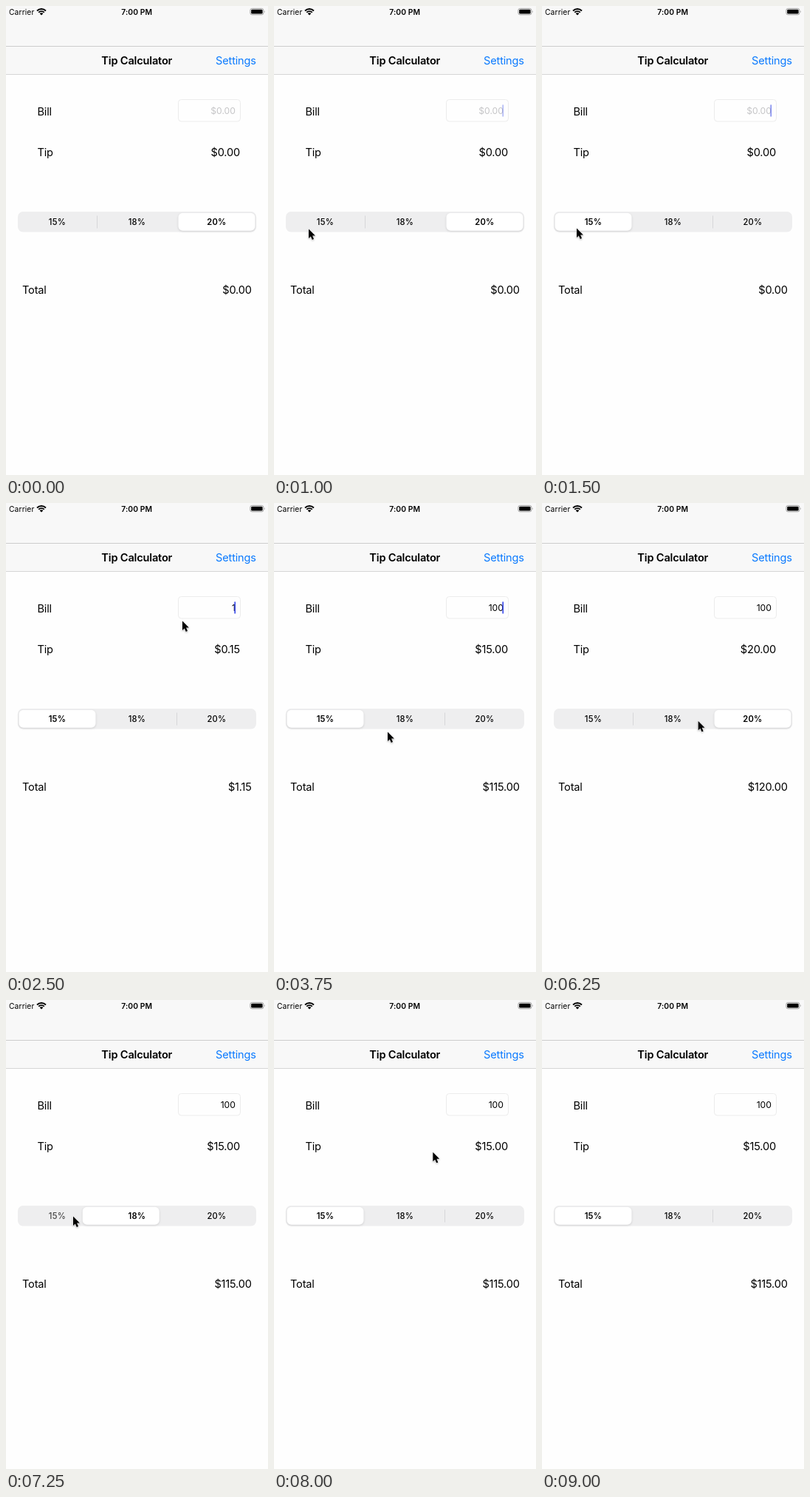
Recreate the animation shown at these times as an HTML page. Size 355 by 634 pixels, loop 9.5 s.

```html
<!DOCTYPE html>
<html lang="en">
<head>
<meta charset="utf-8">
<title>Tip Calculator</title>
<style>
  html, body { margin: 0; width: 100%; height: 100%; overflow: hidden; background: #fefefe; }
  svg { display: block; width: 355px; height: 634px; }
  text { font: 14.6px Inter, Roboto, sans-serif; letter-spacing: -.013em; fill: #000; }
  .end { text-anchor: end; }
  .mid { text-anchor: middle; }
  .bold { font-weight: 600; }
  .status { font-size: 10.3px; letter-spacing: .01em; }
  .input { font-size: 12.2px; letter-spacing: 0; }
  .option { font-size: 11.2px; font-weight: 500; letter-spacing: .02em; }
  .option.on { font-weight: 600; }
  #thumb { filter: drop-shadow(0 1px 1.5px #0002); }
</style>
</head>
<body>
<svg viewBox="0 0 355 634">
  <rect width="355" height="92.5" fill="#f8f8f8"/>
  <path d="M0 54.5H355" stroke="#cdcdcd"/>
  <path d="M0 92.5H355" stroke="#d6d6d6"/>

  <text class="status" x="4" y="11.6">Carrier</text>
  <clipPath id="fan"><path d="M48 12.4l-10-10V0h20v2.4z"/></clipPath>
  <g clip-path="url(#fan)" fill="none" stroke="#000" stroke-width="1.9">
    <circle cx="48" cy="12.4" r="8.4"/>
    <circle cx="48" cy="12.4" r="5.3"/>
    <circle cx="48" cy="12.4" r="1.6" stroke-width="3.2"/>
  </g>
  <text class="status mid bold" x="177.2" y="11.6">7:00 PM</text>
  <rect x="330.9" y="3.4" width="18" height="8.4" rx="2.4" fill="none" stroke="#999" stroke-width=".9"/>
  <rect x="332.2" y="4.7" width="15.4" height="5.8" rx="1.3"/>
  <path d="M350 6.2q1.600 1.4 0 2.8z" fill="#999"/>

  <text class="mid bold" x="177.3" y="78.5">Tip Calculator</text>
  <text class="end" x="338.8" y="78.5" style="fill:#0a7aff">Settings</text>

  <text x="42.5" y="148">Bill</text>
  <rect x="233.5" y="126.5" width="84" height="29.5" rx="4" fill="#fefefe" stroke="#ececec"/>
  <text id="bill" class="end input" x="311" y="146.2"></text>
  <rect id="caret" x="309.4" y="133.5" width="1.7" height="16" fill="#3d4dea"/>
  <text x="42.5" y="202.5">Tip</text>
  <text id="tip" class="end" x="317" y="202.5"></text>

  <rect x="16" y="278" width="323" height="27.5" rx="7" fill="#eeeeef"/>
  <path class="divider" d="M123.5 283.5v17" stroke="#d6d6d9"/>
  <path class="divider" d="M231.5 283.5v17" stroke="#d6d6d9"/>
  <rect id="thumb" y="279.7" width="104" height="24" rx="6" fill="#fff"/>
  <text class="option mid" x="69.4" y="296">15%</text>
  <text class="option mid" x="177.4" y="296">18%</text>
  <text class="option mid" x="285.4" y="296">20%</text>

  <text x="22" y="389">Total</text>
  <text id="total" class="end" x="332.8" y="389"></text>

  <path id="cursor" d="M0 .5V13L2.8 10.400L4.800 15L7 14.100L5.100 9.500H8.900Z"
    stroke="#fff" paint-order="stroke" style="filter:drop-shadow(0 1px 1px #0004)"/>
</svg>
<script>
const LOOP = 9.5, STEP = .25, SLIDE = .26;
const RATES = [.15, .18, .20];
// [time, option]
const TAPS = [[-1, 2], [1.01, 0], [4.6, 1], [5.4, 2], [6.4, 1], [7.175, 0]];
const TYPED = [[0, ''], [2.25, '1'], [2.75, '10'], [3, '100']];
// [time, x, y]
const PATH = [
  [.25, 290, 142], [.5, 285, 142], [1, 47, 301], [1.5, 47, 300], [2.25, 239, 159],
  [3.25, 239, 159], [3.75, 154, 309], [4, 106, 309], [4.75, 172, 296], [5, 195, 295],
  [5.25, 257, 295], [5.5, 275, 295], [5.75, 275, 295], [6.5, 180, 294], [7, 100, 293],
  [7.25, 91, 292], [7.5, 88, 292], [8.25, 279, 162], [8.75, 106, 10]
];

const $ = id => document.getElementById(id);
const options = document.querySelectorAll('.option');
const dividers = document.querySelectorAll('.divider');
const clamp = v => Math.min(1, Math.max(0, v));
const ease = u => u * u * (3 - 2 * u);
const lastIndex = (list, t) => list.findLastIndex(([at]) => at <= t);
const money = v => '$' + v.toFixed(2);

function drawCursor(t) {
  const i = lastIndex(PATH, t);
  const visible = i >= 0 && t < 9;
  $('cursor').style.display = visible ? '' : 'none';
  if (!visible) return;
  const [t0, x0, y0] = PATH[i], [t1, x1, y1] = PATH[i + 1] || [9, x0, y0];
  const u = (t - t0) / (t1 - t0);
  $('cursor').setAttribute('transform', `translate(${x0 + (x1 - x0) * u} ${y0 + (y1 - y0) * u})`);
}

function drawOptions(t) {
  const i = lastIndex(TAPS, t);
  const [at, to] = TAPS[i];
  const from = i ? TAPS[i - 1][1] : to;
  const p = ease(clamp((t - at) / SLIDE));
  const selected = p < .5 ? from : to;
  $('thumb').setAttribute('x', 17.5 + 108 * (from + (to - from) * p));
  options.forEach((el, k) => {
    el.classList.toggle('on', k === selected);
    el.style.opacity = k === to && k !== selected ? .7 : 1;
  });
  const touches = (k, option) => option === k || option === k + 1;
  dividers.forEach((el, k) => {
    el.style.opacity = touches(k, to) || (p < 1 && touches(k, from)) ? 0 : 1;
  });
  return RATES[to];
}

function draw(t) {
  const rate = drawOptions(t);
  const bill = TYPED[lastIndex(TYPED, t)][1];
  $('bill').textContent = bill || '$0.00';
  $('bill').style.fill = bill ? '#000' : '#c5c5c7';
  $('tip').textContent = money(bill * rate);
  $('total').textContent = money(bill * (1 + rate));
  const blink = t < 2 ? clamp(.5 + .9 * Math.cos(2 * Math.PI * (t - .73))) : 1;
  $('caret').style.opacity = t >= .5 && t < 4 ? blink : 0;
  drawCursor(t);
}

function tick(now) {
  const t = now / 1000 % LOOP;
  draw(Math.floor(t / STEP) * STEP);
  requestAnimationFrame(tick);
}
tick(performance.now());
</script>
</body>
</html>
```
